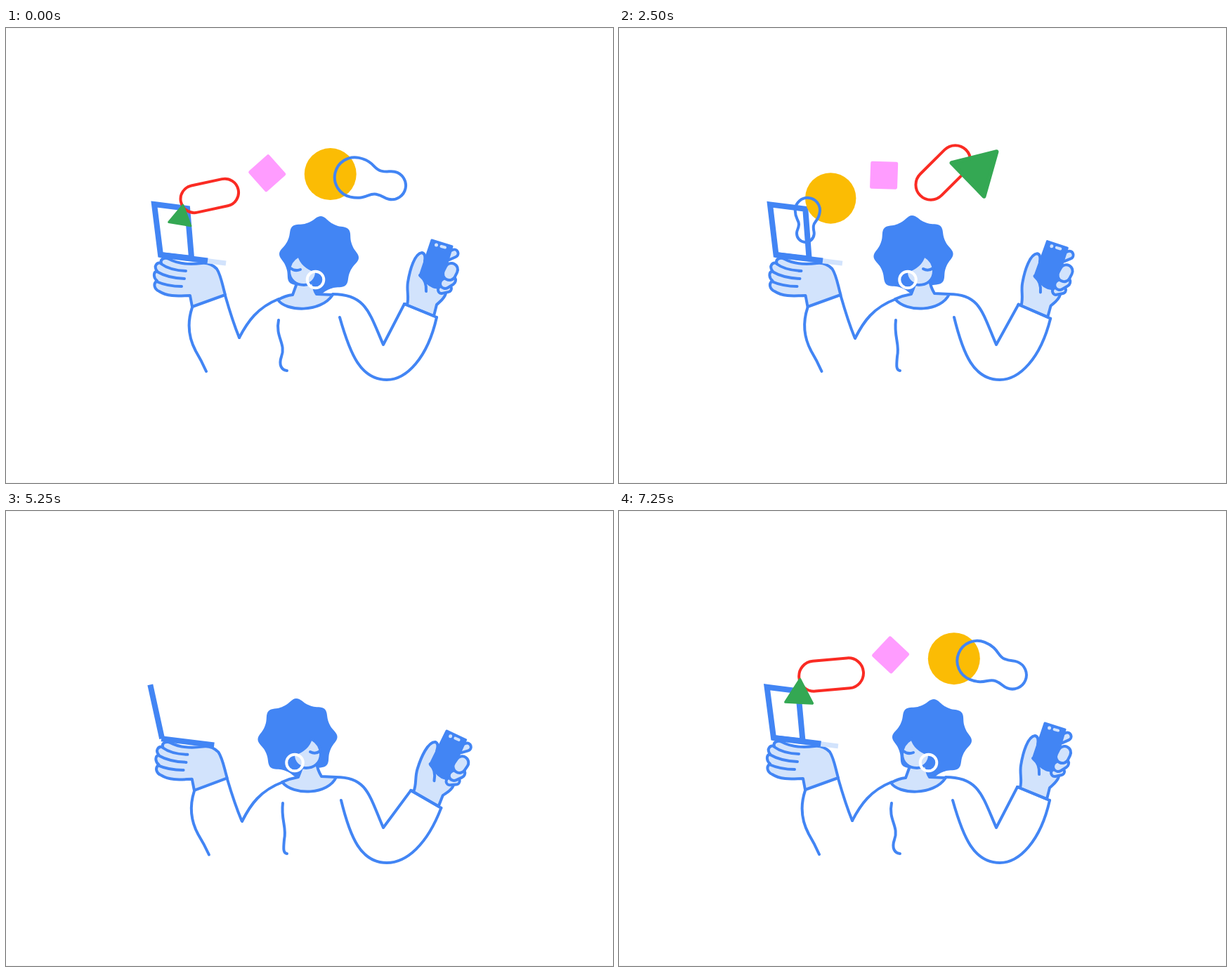
Recreate the animation shown at these times as an HTML page. Size 864 by 648 pixels, loop 7300 ms.

```html
<!DOCTYPE html>
<html lang="en">
<head>
<meta charset="utf-8">
<title>Shapes between devices</title>
<style>
  html, body { margin: 0; width: 100%; height: 100%; overflow: hidden; background: #fff; }
  svg { display: block; width: 100vw; height: 100vh; }
  .line { fill: none; stroke: #4285f4; stroke-width: 4; stroke-linecap: round; stroke-linejoin: round; }
  .skin { fill: #d2e3fc; }
  .hair { fill: #4285f4; }
  .device { fill: none; stroke: #4285f4; stroke-width: 8; stroke-linejoin: miter; }
  .thin { vector-effect: non-scaling-stroke; }
</style>
</head>
<body>
<svg viewBox="0 0 864 648">
  <path d="M0 .5H864M0 647.5H864" stroke="#f7f7f7"/>

  <g id="leftArm">
    <path class="line" d="M265 398C256 425 262 445 270 460C276 470 281 480 285 489M312 381C318 402 325 424 332 441"/>
    <path class="line skin" d="M312 380C308 366 306 352 300 343C292 335 285 334 278 335C262 337 245 336 232 329C226 326 219 329 221 335C214 333 210 340 215 346C209 348 210 356 215 360C209 364 211 372 218 375C232 384 250 381 262 381L265 397Z"/>
    <path class="line" d="M221 336Q233 345 256 346M215 347Q230 356 254 357M214 361Q230 368 250 368"/>
    <path id="baseEdge" class="device" style="stroke:#d2e3fc;stroke-width:7"/>
    <path id="base" class="device"/>
    <path id="screen" class="device"/>
  </g>

  <path id="shoulder" class="line"/>
  <path id="torso" class="line"/>
  <path id="sleeve" class="line"/>

  <g id="rightHand">
    <path class="line skin" d="M567 393L571 394C574 383 570 374 572 362C575 343 582 321 592 320C597 321 597 326 596 332L600 360L626 378C624 386 617 390 613 394L609 410Z"/>
    <g id="indexFinger"></g>
    <path class="hair" stroke="#4285f4" stroke-width="3" stroke-linejoin="round" d="M606 302L635 311L618 368C612 372 604 368 598 362L589 353Z"/>
    <circle cx="612.5" cy="309" r="2.5" class="skin"/>
    <path d="M619.5 311L625 312.5" stroke="#d2e3fc" stroke-width="4" stroke-linecap="round"/>
    <g id="fingers"></g>
    <path class="line" d="M589 352Q599 360 598 375"/>
    <path class="line" d="M567 393L613 412"/>
  </g>

  <path id="hair" class="hair"/>
  <path id="neck" class="line skin"/>
  <path id="face" class="line skin"/>
  <path id="eye" class="line"/>
  <circle id="earring" cy="358.5" r="11.8" fill="none" stroke="#fff" stroke-width="4"/>

  <g id="square"><path d="M-17-17H17V17H-17Z" fill="#ff9cff" stroke="#ff9cff" stroke-width="5" stroke-linejoin="round"/></g>
  <g id="pill"><rect class="thin" x="-46" y="-21.5" width="92" height="43" rx="21.5" fill="none" stroke="#fa2b23" stroke-width="4"/></g>
  <g id="triangle"><path d="M0-38L33 19H-33Z" fill="#34a853" stroke="#34a853" stroke-width="6" stroke-linejoin="round"/></g>
  <g id="circle"><circle r="37" fill="#fbbc04"/></g>
  <g id="blob"><path class="line thin" d="M-22-28.5C0-28.5 2-17 13-17S24-20 32-20A20 20 0 0 1 32 20C24 20 24 17 13 17S0 28.5-22 28.5A28.5 28.5 0 0 1-22-28.5Z"/></g>
</svg>

<script>
const LOOP = 7300;
const $ = id => document.getElementById(id);
const set = (id, name, value) => $(id).setAttribute(name, value);
const clamp = v => Math.max(0, Math.min(1, v));
const ease = v => (1 - Math.cos(Math.PI * clamp(v))) / 2;
const mix = (a, b, p) => a + (b - a) * p;

// Blends two paths that share the same commands.
function morph(from, to, p) {
  const ends = to.match(/-?[\d.]+/g);
  let i = 0;
  return from.replace(/-?[\d.]+/g, n => mix(+n, +ends[i++], p).toFixed(2));
}

function track(keys, t) {
  const i = Math.max(1, keys.findIndex(k => k[0] >= t));
  const [t0, a] = keys[i - 1], [t1, b] = keys[i];
  return mix(a, b, ease((t - t0) / (t1 - t0)));
}

const tracks = {
  leftArm: [[0, 0], [780, -4.1], [1600, .2], [2500, 0], [3020, -2.6], [3900, 4.4], [4900, -.9], [6000, .3], [6600, -.6], [7150, 0], [LOOP, 0]],
  rightArm: [[0, 0], [750, 5], [1600, 4.8], [2450, 1.2], [3050, 4.4], [3950, 5], [5200, 7.7], [6000, 6.2], [6650, 7.2], [7280, 0], [LOOP, 0]],
  turn: [[0, 0], [1000, 0], [1600, 1], [6200, 1], [6950, 0], [LOOP, 0]],
  laptop: [[6614 - LOOP, 0], [134, 1.07], [2600, 1.07], [3250, 0], [6614, 0], [LOOP + 134, 1.07]],
  hairX: [[0, 445.5], [900, 443], [1650, 420], [2500, 419], [3500, 415], [5250, 415], [6000, 416.5], [6950, 445], [LOOP, 445.5]],
  hairY: [[0, 324.5], [900, 322.5], [2500, 323.5], [5250, 323.5], [6000, 322.5], [7000, 324.5], [LOOP, 324.5]]
};

const poses = {
  shoulder: ["M332 441C344 418 358 398 388 386", "M336 442C348 418 362 398 394 386"],
  torso: ["M388 416C383 440 399 450 392 468C388 480 392 487 400 488", "M394 416C391 440 400 450 396 468C395 480 394 487 400 488"],
  neck: ["M387 387Q398 381 408 380L416 358H437Q437 372 442 379L465 380C448 406 398 404 387 387Z",
         "M393 386Q404 381 416 379L424 358H442Q443 368 449 378L470 379C459 404 409 406 393 386Z"],
  face: ["M417 324C410 328 403 335 403 346C403 360 414 366 424 366C434 366 442 358 442 347C431 343 420 336 417 324Z",
         "M434 324C431 336 420 343 409 347C409 358 417 366 427 366C437 366 448 360 448 346C448 335 441 328 434 324Z"],
  eye: ["M405 342Q411 347 419 344", "M433 343Q440 347 447 342"]
};

const laptop = {
  screen: ["M204 246L204 246L220 323L220 323Z", "M211 251L258 257L264 328L220 323Z"],
  base: ["M219 323L294 333", "M219 323L287 331.5"],
  baseEdge: ["M280 331L293 333", "M285 331.5L313 335"]
};

// left: [phase at loop end, speed, angle, spin, drop]; right: [phase at 2500 ms, angle, spin, drop]
const shapes = {
  triangle: { left: [2.717, .00181, 9.5, .139, 8], right: [1.983, 46, -.139, -9] },
  pill: { left: [2.341, .00173, -12, -.142, 8], right: [1.703, -45, .142, 2] },
  square: { left: [1.841, .0016, 48, .1, 1], right: [1.234, 2, -.1, 1] },
  circle: { left: [1.365, .00163, 0, 0, 4], right: [.727, 0, 0, 5] },
  blob: { left: [1.05, .00154, 12.5, -.193, 2], right: [.366, 95, .2055, 4] }
};

function placeShape(id, t) {
  const { left, right } = shapes[id];
  const after = t < 3000 ? t : t - LOOP;
  let phase = left[0] + after * left[1];
  let x = 423 + 191 * Math.cos(phase);
  let y = 304 - 102 * Math.sin(phase) + left[4];
  let angle = left[2] + after * left[3];
  if (phase < 0 || phase > Math.PI) {
    const since = t - 2500;
    phase = right[0] + since * .00166;
    x = 437 - 182 * Math.cos(phase);
    y = 306 - 103 * Math.sin(phase) + right[3];
    angle = right[1] + since * right[2];
  }
  const visible = phase > 0 && phase < Math.PI;
  set(id, "visibility", visible ? "visible" : "hidden");
  if (!visible) return;
  const scale = Math.min(1, .25 + phase, (Math.PI - phase) / .88);
  set(id, "opacity", clamp(phase / .15));
  set(id, "transform", `translate(${x} ${y}) rotate(${angle}) scale(${scale})`);
}

function finger(x1, y1, x2, y2, width) {
  const d = `M${x1} ${y1}L${x2} ${y2}`;
  const stroke = (color, w) => `<path d="${d}" stroke="${color}" stroke-width="${w}" stroke-linecap="round"/>`;
  return stroke("#4285f4", width + 4) + stroke("#d2e3fc", width - 4);
}
$("indexFinger").innerHTML = finger(629, 325, 638, 321, 11);
$("fingers").innerHTML = finger(620, 373, 629, 371, 10) + finger(625, 364, 633, 359, 14) + finger(631, 350, 634, 344, 18);

const hairPoints = Array.from({ length: 160 }, (_, i) => {
  const a = i * Math.PI / 80, r = 52.6 + 3.5 * Math.cos(8 * a) + .5 * Math.cos(16 * a);
  return `${(r * Math.cos(a)).toFixed(2)} ${(r * Math.sin(a)).toFixed(2)}`;
});
set("hair", "d", `M${hairPoints.join("L")}Z`);

const elbow = [535, 465];
function swing(x, y, degrees) {
  const a = degrees * Math.PI / 180, dx = x - elbow[0], dy = y - elbow[1];
  return `${elbow[0] + dx * Math.cos(a) - dy * Math.sin(a)} ${elbow[1] + dx * Math.sin(a) + dy * Math.cos(a)}`;
}

function draw(t) {
  const now = {};
  for (const name in tracks) now[name] = track(tracks[name], t);
  const { turn, rightArm } = now;

  for (const id in poses) set(id, "d", morph(...poses[id], turn));
  for (const id in laptop) set(id, "d", morph(...laptop[id], now.laptop));
  set("earring", "cx", mix(440.5, 411, turn));
  set("hair", "transform", `translate(${now.hairX} ${now.hairY}) rotate(${mix(3, -2, turn)})`);
  set("leftArm", "transform", `translate(${3.5 * turn} 0) rotate(${now.leftArm} 335 449)`);
  set("rightHand", "transform", `rotate(${rightArm} ${elbow})`);

  const s = turn * 2;
  set("sleeve", "d", `M${465 + s * 2.5} 379C${512 + s} 379 517 405 537 451L${swing(567, 393, rightArm)}` +
    `M${swing(613, 412, rightArm)}C${swing(600, 470, rightArm * .6)} 570 501 542 501C505 501 490 465 ${475 + s} 412`);

  for (const id in shapes) placeShape(id, t);
}

const start = performance.now();
function tick() {
  draw((performance.now() - start) % LOOP);
  requestAnimationFrame(tick);
}
tick();
</script>
</body>
</html>
```
